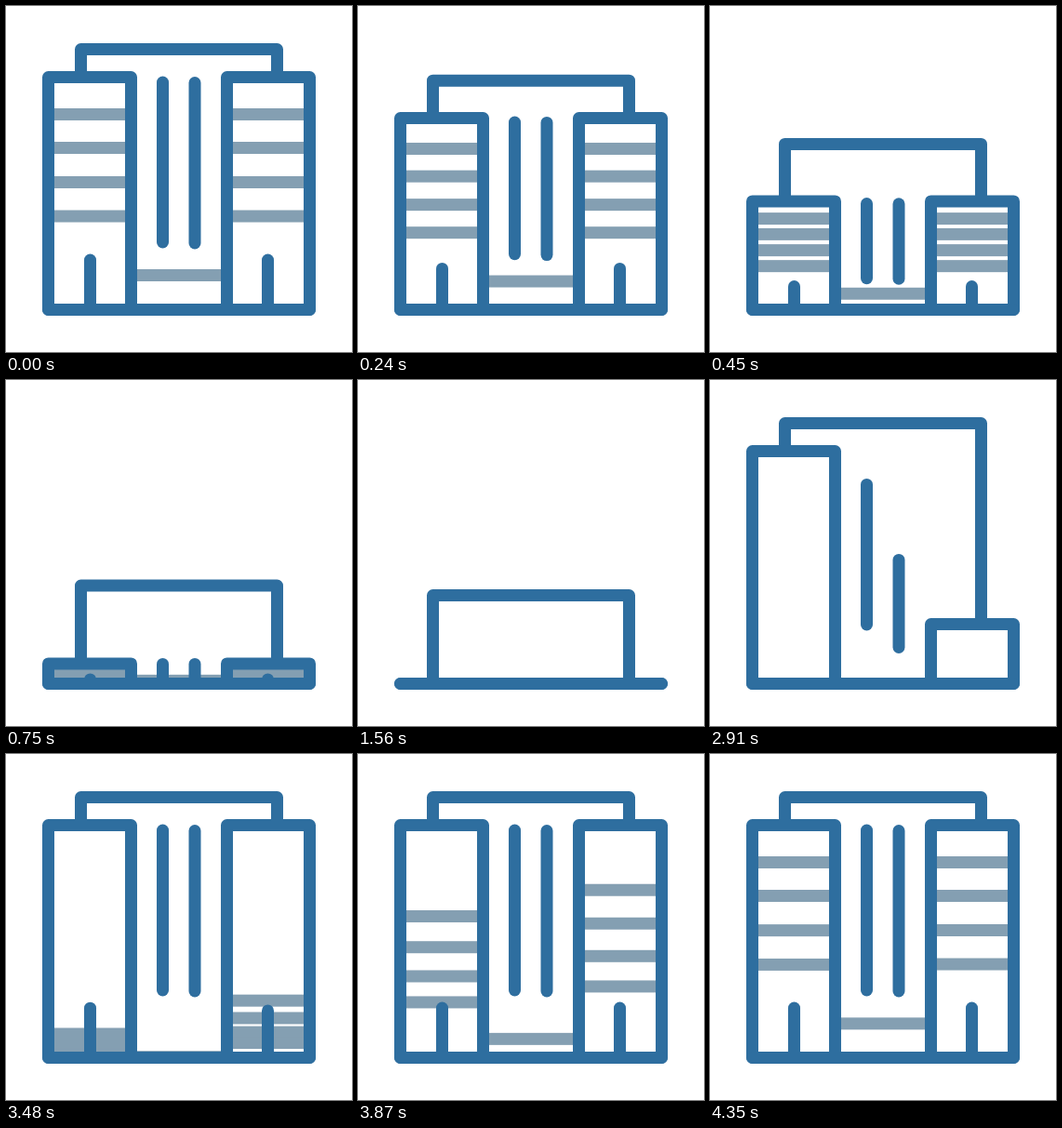
Animation of 372 by 372 pixels, one loop 5400 ms. Source, as an HTML page with a canvas:

```html
<!DOCTYPE html>
<html lang="en">
<head>
<meta charset="utf-8">
<title>Building</title>
<style>
  html, body { margin: 0; width: 100%; height: 100%; overflow: hidden; background: #fff; }
  canvas { display: block; }
</style>
</head>
<body>
<canvas id="stage" width="372" height="372"></canvas>
<script>
const ctx = document.getElementById('stage').getContext('2d');
const LOOP = 5400, STEP = 30, COLLAPSE = 1000;
const BASE = 326.5, BLUE = '#2e6e9f', GREY = '#849fb2';
const FLOORS = [116.5, 152.5, 189.5, 226];

// Cubic bezier easing (.34, 0, .475, 1)
function ease(x) {
  if (x <= 0) return 0;
  if (x >= 1) return 1;
  let low = 0, high = 1, s;
  for (let i = 0; i < 24; i++) {
    s = (low + high) / 2;
    const at = 3 * .34 * s * (1 - s) ** 2 + 3 * .475 * s * s * (1 - s) + s ** 3;
    if (at < x) low = s; else high = s;
  }
  return s * s * (3 - 2 * s);
}

// Everything sinks together, then each part rises on its own schedule
function growth(t, start, duration) {
  return t < COLLAPSE ? 1 - ease(t / COLLAPSE) : ease((t - start) / duration);
}

const lift = (y, amount) => BASE - (BASE - y) * amount;

function stroke(points, color = BLUE) {
  ctx.strokeStyle = color;
  ctx.beginPath();
  points.forEach(([x, y]) => ctx.lineTo(x, y));
  ctx.stroke();
}

function bar(t, x1, x2, y, order) {
  const cy = lift(y, growth(t, 3151 + order * 30, 1050));
  ctx.fillStyle = GREY;
  ctx.fillRect(x1, cy - 6.5, x2 - x1, 13);
}

function tower(t, x1, x2, start, firstBar) {
  const top = lift(76.5, growth(t, start, 720));
  ctx.fillStyle = '#fff';
  ctx.fillRect(x1, top, x2 - x1, BASE - top);
  FLOORS.forEach((y, i) => bar(t, x1 + 6, x2 - 5.5, y, firstBar + i));
  stroke([[x1, BASE], [x1, top], [x2, top], [x2, BASE]]);
}

function post(t, x, top, bottom, start) {
  const amount = growth(t, start, 600);
  stroke([[x, lift(top, amount)], [x, lift(bottom, amount)]]);
}

function draw(t) {
  ctx.fillStyle = '#fff';
  ctx.fillRect(0, 0, 372, 372);
  ctx.lineWidth = 13;
  ctx.lineCap = ctx.lineJoin = 'round';

  const roof = 237.5 - 191 * growth(t, 1500, 590);
  stroke([[80.5, BASE], [80.5, roof], [291.5, roof], [291.5, BASE]]);
  bar(t, 140, 232, 289.5, 8);
  tower(t, 45.5, 134.5, 2070, 4);
  tower(t, 237.5, 326.5, 2700, 0);
  post(t, 168.5, 82, 254, 2488);
  post(t, 203, 82.5, 255, 2636);
  post(t, 90.5, 273, BASE, 2910);
  post(t, 281.5, 273, BASE, 3000);
  stroke([[45.5, BASE], [326.5, BASE]]);
}

function tick() {
  draw(Math.floor(performance.now() % LOOP / STEP) * STEP);
  requestAnimationFrame(tick);
}
tick();
</script>
</body>
</html>
```
